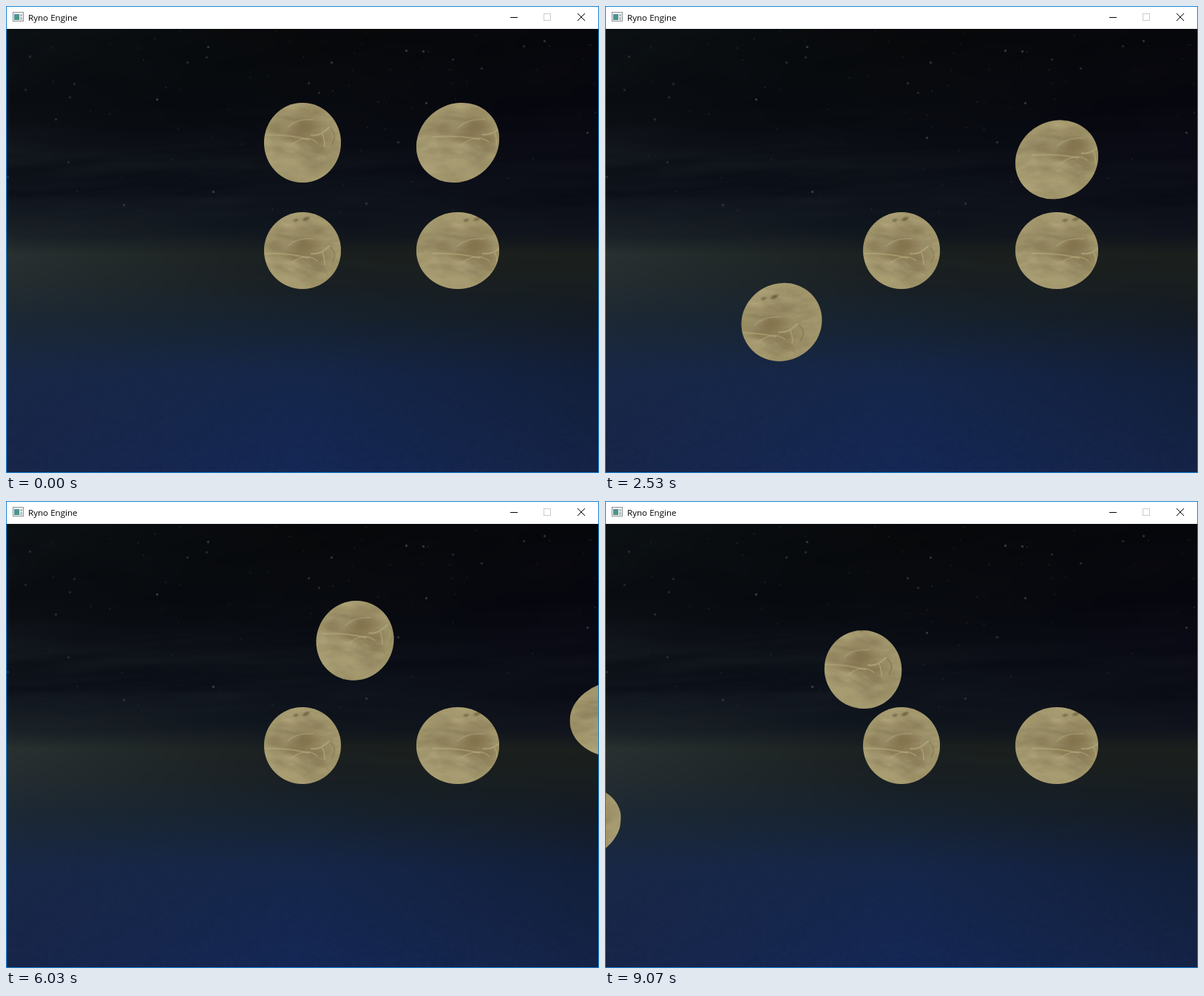
Write an HTML page with a canvas that moves like this. It is 802 px wide and 632 px high and loops after 9110 ms.

```html
<!DOCTYPE html>
<html>
<head>
<meta charset="utf-8">
<title>Ryno Engine</title>
<style>
  html, body { margin: 0; width: 100%; height: 100%; overflow: hidden; background: #fff; }
  canvas { display: block; }
</style>
</head>
<body>
<canvas id="stage" width="802" height="632"></canvas>
<script>
const W = 802, H = 632, LOOP = 9110;
const CX = 401, CY = 331, FOCAL = 520, RADIUS = 52, GRAVITY = 700;
const ctx = document.getElementById('stage').getContext('2d');

// ---------- helpers ----------
const lerp = (a, b, u) => a + (b - a) * u;
const clamp = (v, lo, hi) => Math.min(hi, Math.max(lo, v));

function hash(x, y) {
  let h = Math.imul(x, 374761393) + Math.imul(y, 668265263) | 0;
  h = Math.imul(h ^ h >>> 13, 1274126177);
  return ((h ^ h >>> 16) >>> 0) / 4294967296;
}
function noise(x, y) {
  const i = Math.floor(x), j = Math.floor(y);
  let u = x - i, v = y - j;
  u *= u * (3 - 2 * u);
  v *= v * (3 - 2 * v);
  return lerp(lerp(hash(i, j), hash(i + 1, j), u), lerp(hash(i, j + 1), hash(i + 1, j + 1), u), v);
}
function fbm(x, y, octaves) {
  let sum = 0, amp = 0.5;
  for (let k = 0; k < octaves; k++, amp /= 2, x *= 2, y *= 2) sum += amp * (noise(x + k * 19, y + k * 7) - 0.5);
  return sum;
}
function makeLayer(w, h) {
  const c = document.createElement('canvas');
  c.width = w;
  c.height = h;
  return c;
}
function fillPixels(c, x0, y0, x1, y1, shade) {
  const g = c.getContext('2d'), img = g.createImageData(x1 - x0, y1 - y0);
  let p = 0;
  for (let y = y0; y < y1; y++)
    for (let x = x0; x < x1; x++, p += 4) {
      const rgb = shade(x, y);
      for (let k = 0; k < 3; k++) img.data[p + k] = rgb[k];
      img.data[p + 3] = 255;
    }
  g.putImageData(img, x0, y0);
  return g;
}

// ---------- sky ----------
// row: y, then colours at the left edge, the middle and the right edge
const SKY = [
  [31, '0b1013', '07080a', '07080c'],
  [130, '090d11', '070a0e', '07070f'],
  [200, '10141b', '0b0e15', '0a0b15'],
  [260, '12171f', '0e131b', '0c0e18'],
  [310, '1a2126', '10161d', '10131b'],
  [335, '283030', '1a1f1e', '1b1f1c'],
  [370, '252d30', '191f22', '191e1e'],
  [420, '1c2833', '16222e', '141b24'],
  [500, '182746', '15264a', '121f3a'],
  [632, '172549', '142755', '142346']
].map(([y, ...cols]) => ({ y, cols: cols.map(c => [0, 2, 4].map(i => parseInt(c.substr(i, 2), 16))) }));

const STARS = [
  [32, 68], [92, 105], [86, 123], [26, 113], [67, 153], [204, 126], [84, 211], [273, 55], [271, 69], [245, 76],
  [409, 104], [423, 117], [440, 76], [541, 60], [564, 61], [604, 72], [643, 84], [568, 131], [530, 184],
  [786, 171], [728, 47], [700, 54], [435, 178], [487, 267], [159, 269], [2, 231], [280, 251]
];

function skyColour(x, y) {
  let i = 0;
  while (i < SKY.length - 2 && y >= SKY[i + 1].y) i++;
  const a = SKY[i], b = SKY[i + 1], v = (y - a.y) / (b.y - a.y);
  const side = x < CX ? 0 : 1, u = x / 400 - side;
  const cloudy = Math.exp(-(((y - 230) / 62) ** 2)) * (x < 330 ? 1 : 0.65);
  let d = fbm(x / 190 + 3, (y + x * 0.03) / 17, 4) * 20 * cloudy;
  if (y < 170) d += fbm(x / 130, (y + x * 0.12) / 45 + 40, 3) * 5;
  if (y > 400) d += (hash(x, y) - 0.5) * 2 + fbm((x + y * 0.4) / 5, y / 4, 2) * 5 * (y - 400) / 230;
  return [0, 1, 2].map(k => lerp(
    lerp(a.cols[side][k], a.cols[side + 1][k], u),
    lerp(b.cols[side][k], b.cols[side + 1][k], u), v) + d);
}

function drawSky(layer) {
  const g = fillPixels(layer, 1, 31, 801, 631, skyColour);
  STARS.forEach(([x, y], i) => {
    g.fillStyle = `rgba(110,125,130,${0.22 + 0.2 * hash(i, 5)})`;
    g.beginPath();
    g.arc(x + 0.5, y + 0.5, 1.7, 0, 7);
    g.fill();
  });
  for (let i = 0; i < 70; i++) {
    g.fillStyle = `rgba(110,120,130,${0.1 + 0.1 * hash(i, 2)})`;
    g.fillRect(1 + 798 * hash(i, 8), 33 + 260 * hash(i, 9) ** 1.5, 2, 2);
  }
}

// ---------- window frame ----------
function line(g, colour, ...pts) {
  g.strokeStyle = colour;
  g.beginPath();
  for (let i = 0; i < pts.length; i += 4) {
    g.moveTo(pts[i], pts[i + 1]);
    g.lineTo(pts[i + 2], pts[i + 3]);
  }
  g.stroke();
}
function drawWindow(g) {
  g.fillStyle = '#fff';
  g.fillRect(0, 0, W, 31);
  g.lineWidth = 1;
  g.strokeStyle = '#1883d7';
  g.strokeRect(0.5, 0.5, W - 1, H - 1);

  g.fillStyle = '#f4f4f4';
  g.fillRect(9, 8, 15, 13);
  g.strokeStyle = '#8f9499';
  g.strokeRect(9.5, 8.5, 14, 12);
  const pane = g.createLinearGradient(11, 10, 18, 19);
  pane.addColorStop(0, '#5a8fa8');
  pane.addColorStop(1, '#3f9a78');
  g.fillStyle = pane;
  g.fillRect(11, 11, 7, 8);
  g.fillStyle = '#b9bec4';
  g.fillRect(19, 11, 3, 3);
  g.fillRect(19, 15, 3, 4);

  g.fillStyle = '#000';
  g.font = '11.6px "Open Sans", "Noto Sans", sans-serif';
  g.fillText('Ryno Engine', 30, 20);

  line(g, '#000', 682, 15.5, 692, 15.5);
  g.strokeStyle = '#ccc';
  g.strokeRect(727.5, 10.5, 9, 9);
  line(g, '#000', 773, 10, 783, 20, 783, 10, 773, 20);
}

// ---------- moon surface ----------
const SKIN = 170, MID = SKIN / 2;
function makeSkin() {
  const c = makeLayer(SKIN, SKIN);
  const g = fillPixels(c, 0, 0, SKIN, SKIN, (x, y) => {
    const bend = 5 * Math.sin(x / 23);
    const n = fbm(x / 34, (y + bend) / 17, 4) * 44 + fbm(x / 12 + 9, (y + bend) / 4, 2) * 16;
    return [158 + n, 146 + n, 107 + n * 0.85];
  });
  g.translate(MID, MID);
  g.lineCap = 'round';
  const blob = (x, y, rx, ry, tilt, colour) => {
    g.save();
    g.translate(x, y);
    g.rotate(tilt);
    g.scale(rx, ry);
    const r = g.createRadialGradient(0, 0, 0.3, 0, 0, 1);
    r.addColorStop(0, `rgba(${colour})`);
    r.addColorStop(1, `rgba(${colour.replace(/[^,]+$/, '0')})`);
    g.fillStyle = r;
    g.fillRect(-1, -1, 2, 2);
    g.restore();
  };
  const curve = (width, colour, x0, y0, x1, y1, x2, y2) => {
    g.lineWidth = width;
    g.strokeStyle = `rgba(${colour})`;
    g.beginPath();
    g.moveTo(x0, y0);
    g.quadraticCurveTo(x1, y1, x2, y2);
    g.stroke();
  };
  const dark = '124,106,68,', pale = '184,172,126,';
  blob(4, -6, 26, 14, -0.2, dark + '0.6');
  blob(-8, 8, 26, 9, 0.1, dark + '0.45');
  blob(20, 10, 16, 10, 0.3, dark + '0.4');
  blob(-38, -6, 13, 10, 0, dark + '0.3');
  blob(0, -26, 36, 8, 0.1, dark + '0.25');
  blob(5, -43, 7, 3.5, -0.4, '88,76,48,0.7');
  blob(-9, -41, 5, 3, -0.2, '88,76,48,0.55');
  blob(-18, 38, 22, 10, 0.2, pale + '0.45');
  blob(25, 35, 18, 9, -0.3, pale + '0.3');
  curve(2, pale + '0.6', -50, 4, -18, 3, 8, 10);
  curve(1.6, pale + '0.6', -14, 16, 6, 2, 20, 14);
  curve(1.8, pale + '0.7', 12, 4, 24, 6, 36, -6);
  curve(1.6, pale + '0.7', 27, 3, 30, 10, 30, 19);
  curve(1.4, pale + '0.5', -20, -6, -8, -18, 14, -16);
  curve(1.5, dark + '0.6', 38, -4, 48, 4, 40, 16);
  for (let i = 0; i < 5; i++) curve(0.8, dark + '0.6', 8 + i * 4, 16 + i, 14 + i * 4, 22, 22 + i * 3, 28 + i);
  return c;
}

function drawMoon(skin, x, y) {
  const dx = x - CX, dy = y - CY, d2 = dx * dx + dy * dy;
  const phi = Math.atan2(dy, dx);
  const stretch = Math.sqrt(1 + d2 / (FOCAL * FOCAL));
  const turn = RADIUS / (FOCAL * stretch);
  ctx.save();
  ctx.translate(x, y);
  ctx.rotate(phi);
  ctx.scale(stretch, 1);
  ctx.rotate(-phi);
  ctx.beginPath();
  ctx.arc(0, 0, RADIUS, 0, 7);
  ctx.clip();
  ctx.drawImage(skin, dx * turn - MID, dy * turn - MID);
  ctx.fillStyle = rim;
  ctx.fillRect(-60, -60, 120, 120);
  ctx.restore();
}

// ---------- motion ----------
// stop: time in s, x, y, sideways pull and gravity on the way there
const TOP = 225.5;
const ROLLER = [
  [0, 401, 185], [0.136, 401, TOP], [1.02, 401, TOP], [1.767, 241.5, 272, 460],
  [2.3, 238, 541], [2.8, 240, 345], [3.333, 199.5, 327, 288], [3.733, 341, 445, 1275],
  [3.91, 446, 541], [4.125, 571, 436], [4.333, 691, 541], [4.67, 722, 408, -400],
  [5.6, 708, 229, -400, 500], [6.033, 830, 295, -700], [6.55, 702, 539, -600],
  [6.83, 655, 427], [7.05, 600, 541], [7.967, 315, 425], [8.33, 182, 541], [9.067, -47, 437], [9.11, -60, 447]
];
const BOUNCER = [
  [0, 611, 185],
  ...[0.136, 1.02, 1.793, 2.4, 2.91, 3.366, 3.69, 3.93, 4.06].map(t => [t, 611, TOP]),
  [5.3, 611, TOP, 0, 0], [5.6, 602, 226, 0, 0], [5.865, 465, 248], [6.033, 472, 189],
  [6.533, 494, 144, 0, 1100], [6.87, 500, 288, 0, 900], [7.967, 503, 285, 0, 830],
  [8.4, 445, 236], [8.9, 376, 229], [9.11, 342, 231]
];

function place(path, t) {
  let i = 1;
  while (i < path.length - 1 && t > path[i][0]) i++;
  const [t0, x0, y0] = path[i - 1], [t1, x1, y1, pull = 0, fall = GRAVITY] = path[i];
  const u = clamp((t - t0) / (t1 - t0), 0, 1), arc = (t1 - t0) ** 2 * u * (1 - u) / 2;
  return [lerp(x0, x1, u) - pull * arc, lerp(y0, y1, u) - fall * arc];
}

// ---------- scene ----------
const rim = ctx.createRadialGradient(0, 0, 38, 0, 0, RADIUS);
rim.addColorStop(0, 'rgba(176,166,112,0)');
rim.addColorStop(1, 'rgba(176,166,112,0.3)');
const skin = makeSkin();
const back = makeLayer(W, H);
drawSky(back);
drawWindow(back.getContext('2d'));

function frame() {
  const ms = performance.now() % LOOP;
  const t = Math.floor((ms + 5) * 0.03) / 30;
  ctx.drawImage(back, 0, 0);
  ctx.save();
  ctx.beginPath();
  ctx.rect(1, 31, 800, 600);
  ctx.clip();
  for (const [x, y] of [[CX, CY], [611, CY], place(BOUNCER, t), place(ROLLER, t)]) drawMoon(skin, x, y);
  ctx.restore();
  requestAnimationFrame(frame);
}
frame();
</script>
</body>
</html>
```
